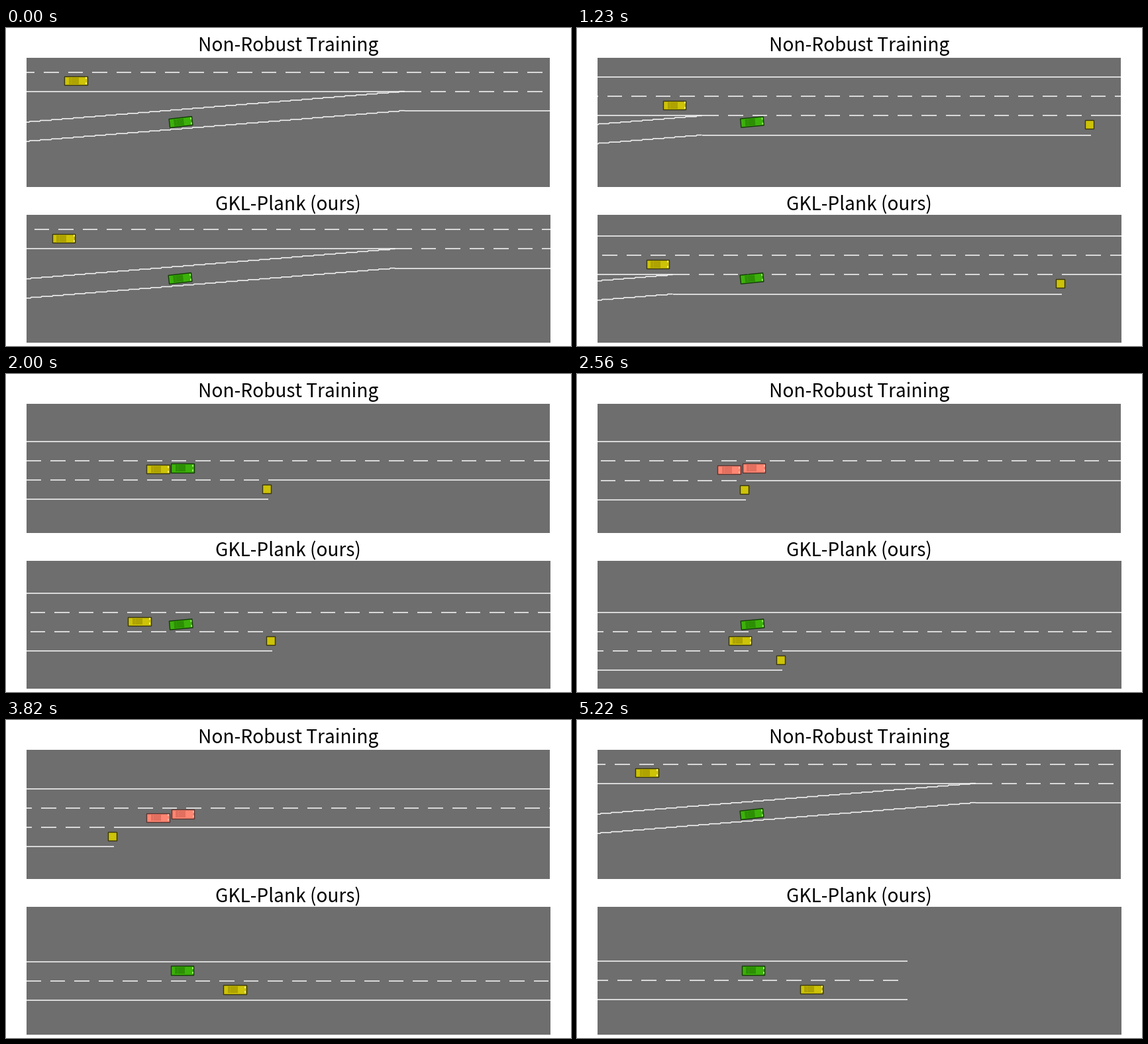
Write a matplotlib script that moves like this. It is 853 px wide and 480 px high and loops after 5.29 s.

```python
import numpy as np
import matplotlib.pyplot as plt
from matplotlib.animation import FuncAnimation
from matplotlib.collections import LineCollection
from matplotlib.patches import Rectangle
from matplotlib.transforms import Affine2D

W, H, DPI = 853, 480, 64
PX = 72 / DPI
LOOP, TICK = 5290, 23
LEFT, RIGHT = 31, 822

# Road geometry in pixels (7.3 px per metre)
LANE, PERIOD, DASH = 29.1, 36.5, 22.5
MERGE_LEN, AFTER_LEN, SLOPE = 584, 1095, 0.081

ASPHALT, PAINT = "#6e6e6e", "#f3f3f3"
YELLOW = ("#cdc308", "#aea300", "#f2ec6a", "#38360c")
GREEN = ("#3cb10a", "#2c8f04", "#8ff05a", "#123a06")
RED = ("#ff8672", "#e26f5f", "#ffb3a2", "#5a3430")

# Moments at which a new picture appears; the playback stutters twice
STEPS = np.array([0, 130, 260, 390, 460, 530, *range(600, 2001, 70),
                  2210, 2280, *range(2560, 5221, 70)])
CRASH, RESTART = 2210, 5220


def curve(*keys):
    """Monotone cubic through (time, value) keys."""
    t, v = np.array(keys, float).T
    h = np.diff(t)
    d = np.diff(v) / h
    m = np.concatenate([d[:1], np.zeros(len(d) - 1), d[-1:]])
    for i in range(1, len(d)):
        if d[i - 1] * d[i] > 0:
            m[i] = 2 * d[i - 1] * d[i] / (d[i - 1] + d[i])

    def at(x):
        x = min(max(x, t[0]), t[-1])
        i = min(np.searchsorted(t, x, side="right") - 1, len(d) - 1)
        u = (x - t[i]) / h[i]
        return ((1 + 2 * u) * (1 - u) ** 2 * v[i] + u * (1 - u) ** 2 * h[i] * m[i]
                + u * u * (3 - 2 * u) * v[i + 1] + u * u * (u - 1) * h[i] * m[i + 1])
    return at


def dashes(y, lo, hi, phase):
    first = phase + PERIOD * np.floor((lo - phase) / PERIOD)
    return [[(max(x, lo), y), (min(x + DASH, hi), y)]
            for x in np.arange(first, hi - 1, PERIOD) if x + DASH > lo]


def ramp(y, corner):
    """Slanted line with the stair steps of a coarse raster."""
    xs = np.arange(LEFT - 2, corner, 1.0)
    rise = np.round(SLOPE * (corner - xs) / 1.33) * 1.33
    return np.column_stack([np.append(xs, corner), y + np.append(rise, 0)])


def road(y, gore):
    """Lane markings; gore is the x where the merging lane ends."""
    merge, end = gore - MERGE_LEN, min(gore + AFTER_LEN, RIGHT)
    y1, y2, y3 = y + LANE, y + 2 * LANE, y + 3 * LANE
    lines = [[(LEFT, y), (end, y)]]
    lines += dashes(y1, LEFT, end, gore)
    if merge > LEFT:
        lines.append([(LEFT, y2), (merge, y2)])
        lines += [ramp(y2, merge - 3), ramp(y3, merge - 3)]
    if gore > LEFT:
        lines += dashes(y2, max(LEFT, merge), gore, gore)
        lines.append([(max(LEFT, merge - 3), y3), (gore, y3)])
    lines.append([(max(LEFT, gore), y2), (end, y2)])
    return lines


class Box:
    """A car, or a plain square when it has no roof and lights."""

    def __init__(self, ax, clip, colors, size=(34.5, 13.2), car=True):
        w, h = size
        self.ax = ax
        self.parts = [self.rect(-w / 2, -h / 2, w, h)]
        if car:
            self.parts += [self.rect(-10.5, -5.2, 15, 10.4), self.rect(-7, -5.2, 1, 10.4),
                           self.rect(14.6, -5.2, 2, 3), self.rect(14.6, 2.2, 2, 3)]
        for p in self.parts:
            ax.add_patch(p)
            p.set_clip_path(clip)
        self.paint(colors)

    def rect(self, x, y, w, h):
        return Rectangle((x, y), w, h, lw=0, zorder=3)

    def paint(self, colors):
        body, roof, light, edge = colors
        for p, c in zip(self.parts, (body, roof, body, light, light)):
            p.set_facecolor(c)
        self.parts[0].set(edgecolor=edge, linewidth=1.4 * PX)
        if len(self.parts) > 1:
            self.parts[2].set_alpha(0.35)

    def place(self, x, y, tilt=0):
        move = Affine2D().rotate_deg(-tilt).translate(x, y) + self.ax.transData
        for p in self.parts:
            p.set_transform(move)


class Scene:
    def __init__(self, ax, box, title, baseline, ego_y, **paths):
        x0, y0, x1, y1 = box
        panel = ax.add_patch(Rectangle((x0, y0), x1 - x0, y1 - y0, fc=ASPHALT, lw=0))
        ax.text(426, baseline, title, ha="center", va="baseline", color="black",
                family="Noto Sans CJK JP", size=28 * PX)
        self.lines = ax.add_collection(
            LineCollection([], colors=PAINT, linewidths=1.6 * PX, zorder=2), autolim=False)
        self.lines.set_clip_path(panel)
        self.block = Box(ax, panel, YELLOW, (13, 13), car=False)
        self.other = Box(ax, panel, YELLOW)
        self.ego = Box(ax, panel, GREEN)
        self.ego_y = ego_y
        self.paths = paths

    def show(self, t, crashed=False):
        p = {k: f(t) for k, f in self.paths.items()}
        self.lines.set_segments(road(p["y"], p["gore"]))
        self.block.place(p["gore"] - 2, p["y"] + 71.7)
        self.other.place(p["other"], p["y"] + 42.1 + p["drift"])
        self.ego.place(p["ego"], self.ego_y, p["tilt"])
        self.other.paint(RED if crashed else YELLOW)
        self.ego.paint(RED if crashed else GREEN)


fig = plt.figure(figsize=(W / DPI, H / DPI), dpi=DPI, facecolor="white")
ax = fig.add_axes([0, 0, 1, 1])
ax.set(xlim=(0, W), ylim=(H, 0))
ax.axis("off")

upper = Scene(
    ax, (31, 45, 821, 240), "Non-Robust Training", 35, 142,
    y=curve((0, 37.4), (600, 63.2), (740, 64), (1160, 72), (1650, 93.3),
            (2000, 101.8), (2560, 102.3), (3190, 103.8), (LOOP, 103.9)),
    gore=curve((0, 1189), (740, 994), (1650, 562), (2000, 396), (2280, 310),
               (2560, 255), (3190, 179), (3800, 163), (4520, 159), (LOOP, 158.5)),
    other=curve((0, 105.5), (740, 114.5), (1650, 190), (2000, 229.5), (LOOP, 229.5)),
    drift=curve((0, 0), (2000, 0), (2560, 0.5), (4520, 1.5), (LOOP, 1.5)),
    ego=curve((0, 264), (740, 264.2), (1650, 264.8), (2210, 267), (LOOP, 267)),
    tilt=curve((0, 6.5), (740, 5.5), (1650, 5), (2000, 0), (LOOP, 0)))

lower = Scene(
    ax, (31, 282, 822, 475), "GKL-Plank (ours)", 275, 378,
    y=curve((0, 275.2), (600, 301.5), (740, 303.2), (1160, 312), (1650, 329.5),
            (2000, 331), (2210, 347), (2280, 360), (2560, 360), (2800, 378.5),
            (3050, 367.5), (3190, 366.5), (4520, 364), (LOOP, 364)),
    gore=curve((0, 1174.5), (740, 963), (1650, 526), (2000, 402), (2280, 342),
               (2560, 310), (3190, 92), (4520, -348), (5220, -596)),
    other=curve((0, 87), (740, 82), (1650, 173), (2560, 246), (3190, 308),
                (4520, 366), (5220, 354)),
    drift=curve((0, 0), (LOOP, 0)),
    ego=curve((0, 263), (740, 264), (1650, 264), (2560, 265), (3190, 266), (LOOP, 266)),
    tilt=curve((0, 6.5), (740, 6), (1650, 5.5), (2560, 5), (2800, 1), (3190, 0), (LOOP, 0)))


def draw(i):
    now = i * TICK + TICK - 1
    t = STEPS[STEPS <= now][-1]
    upper.show(0 if t >= RESTART else t, CRASH <= t < RESTART)
    lower.show(t)
    return []


anim = FuncAnimation(fig, draw, frames=LOOP // TICK, interval=TICK,
                     init_func=lambda: draw(0), repeat=True, repeat_delay=0)
plt.show()
```
